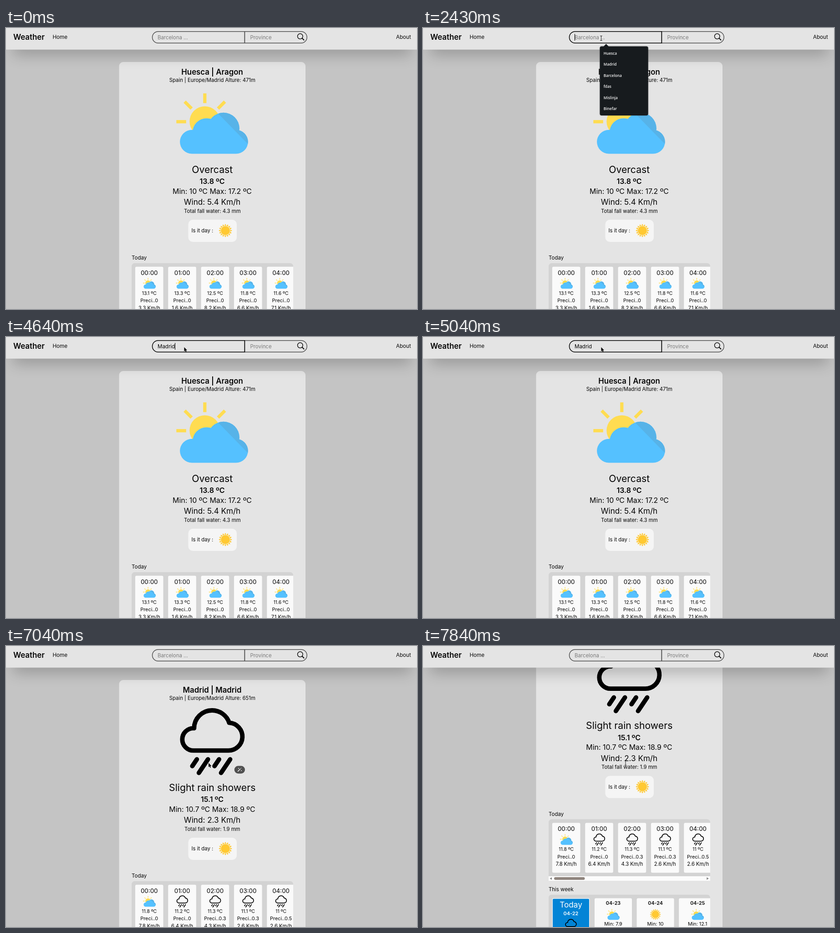
Recreate the animation shown at these times as an HTML page with a canvas. Size 903 by 620 pixels, loop 8 s.

```html
<!DOCTYPE html>
<html lang="en">
<head>
<meta charset="utf-8">
<title>Weather</title>
<style>
html, body { margin: 0; width: 100%; height: 100%; overflow: hidden; background: #c4c4c4; }
canvas { display: block; }
</style>
</head>
<body>
<canvas id="stage" width="903" height="620"></canvas>
<script>
const W = 903, H = 620, LOOP = 8000, TICK = 201;
const ctx = document.getElementById('stage').getContext('2d');

const CLICK = 1350, OPEN = 1405, TYPE = 3410, CLOSE = 4415, LOAD = 5825, DONE = 6630;
const TAU = Math.PI * 2;

const huesca = {
  title: 'Huesca | Aragon', place: 'Spain | Europe/Madrid Alture: 471m',
  sky: 'Overcast', temp: '13.8', min: '10', max: '17.2', wind: '5.4', water: '4.3',
  rainy: false,
  hours: [['13.1', '0', '3.3'], ['13.3', '0', '1.6'], ['12.5', '0', '8.2'], ['11.8', '0', '6.6'], ['11.6', '0', '7.1']]
};
const madrid = {
  title: 'Madrid | Madrid', place: 'Spain | Europe/Madrid Alture: 651m',
  sky: 'Slight rain showers', temp: '15.1', min: '10.7', max: '18.9', wind: '2.3', water: '1.9',
  rainy: true,
  hours: [['11.8', '0', '7.8'], ['11.2', '0', '6.4'], ['11.3', '0.3', '4.3'], ['11.1', '0.3', '2.6'], ['11', '0.5', '2.6']]
};
const week = [['04-23', cloudSun, '7.9'], ['04-24', weekSun, '10'], ['04-25', cloudSun, '12.1']];
const history = ['Huesca', 'Madrid', 'Barcelona', 'fdas', 'Mislinja', 'Binefar'];

function text(s, x, y, size, opt = {}) {
  ctx.font = `${opt.weight || 400} ${size}px ${opt.font || 'Inter, sans-serif'}`;
  ctx.textAlign = opt.align || 'center';
  ctx.fillStyle = opt.color || '#050505';
  ctx.fillText(s, x, y);
}

function box(x, y, w, h, r, color) {
  ctx.beginPath();
  ctx.roundRect(x, y, w, h, r);
  ctx.fillStyle = color;
  ctx.fill();
}

function disc(x, y, r, color) {
  ctx.beginPath();
  ctx.arc(x, y, r, 0, TAU);
  ctx.fillStyle = color;
  ctx.fill();
}

function poly(points, color) {
  ctx.beginPath();
  points.forEach(([x, y]) => ctx.lineTo(x, y));
  ctx.closePath();
  ctx.fillStyle = color;
  ctx.fill();
}

function line(x1, y1, x2, y2) {
  ctx.beginPath();
  ctx.moveTo(x1, y1);
  ctx.lineTo(x2, y2);
  ctx.stroke();
}

// Runs a drawing made around (ox, oy) at another place and scale.
function place(x, y, scale, ox, oy, draw) {
  ctx.save();
  ctx.translate(x, y);
  ctx.scale(scale, scale);
  ctx.translate(-ox, -oy);
  draw();
  ctx.restore();
}

function cloudSun(x, y, scale = 0.178) {
  place(x, y, scale, 453.5, 210.75, () => {
    const yellow = '#ffdc51';
    for (let i = 0; i < 4; i++) {
      ctx.save();
      ctx.translate(437, 206.5);
      ctx.rotate((i - 2) * Math.PI / 4);
      ctx.fillStyle = yellow;
      ctx.fillRect(-3.6, -62.5, 7.2, 21.5);
      ctx.restore();
    }
    disc(437, 206, 33.5, yellow);
    const cloud = new Path2D();
    for (const [cx, cy, r] of [[408.7, 250.8, 26.4], [441, 230, 31], [478, 221.5, 35], [505.5, 250.8, 26.4]]) {
      cloud.moveTo(cx + r, cy);
      cloud.arc(cx, cy, r, 0, TAU);
    }
    cloud.rect(408.7, 230, 96.8, 47.2);
    ctx.fillStyle = '#55c1ff';
    ctx.fill(cloud);
    ctx.clip(cloud);
    poly([[462, 184], [534, 258], [534, 184]], '#57b3e8');
  });
}

function rain(x, y, scale = 0.18) {
  place(x, y, scale, 453, 211, () => {
    ctx.strokeStyle = '#000';
    ctx.lineWidth = 9.8;
    ctx.lineCap = ctx.lineJoin = 'round';
    ctx.beginPath();
    ctx.arc(411.7, 206, 24.7, Math.PI / 2, -Math.PI / 2 + 0.05);
    ctx.arc(452.5, 181.5, 39.5, Math.PI, -0.31);
    ctx.arc(488.5, 200, 30.6, -Math.PI / 2 + 0.05, Math.PI / 2);
    ctx.closePath();
    ctx.stroke();
    for (let i = 0; i < 4; i++) {
      const top = 419 + i * 24.4, long = i % 2;
      line(top, 250, top - (long ? 20 : 10), long ? 280 : 265);
    }
  });
}

function sun(x, y, scale = 1) {
  place(x, y, scale, 0, 0, () => {
    const color = '#ffc933';
    disc(0, 0, 10, color);
    for (let i = 0; i < 16; i++) {
      ctx.rotate(TAU / 16);
      poly([[-2.2, -10.7], [2.2, -10.7], [0, -15]], color);
    }
  });
}

function weekSun(x, y) { sun(x, y, 0.82); }

function hourPanel(data) {
  ctx.save();
  ctx.beginPath();
  ctx.roundRect(276, 518.7, 355, 136, [7, 7, 0, 0]);
  ctx.clip();
  ctx.fillStyle = '#d3d3d3';
  ctx.fillRect(276, 518, 355, 137);
  data.hours.forEach(([temp, fall, wind], i) => {
    const x = 314.7 + i * 72.35;
    box(x - 30.8, 526.7, 61.6, 110, 3, '#fafafa');
    text(`0${i}:00`, x, 544.5, 13.4);
    (data.rainy && i ? rain : cloudSun)(x + 0.3, 563.5);
    text(`${temp} ºC`, x, 588.6, 10.3);
    text(`Preci..${fall}`, x, 605.2, 10.9);
    text(`${wind} Km/h`, x, 621.5, 11.2);
  });
  ctx.fillStyle = '#fcfcfc';
  ctx.fillRect(276, 644.5, 355, 10.2);
  box(288, 646.6, 67.5, 6, 3, '#8f857e');
  poly([[278.5, 649.6], [283, 646.8], [283, 652.4]], '#858585');
  poly([[627.8, 649.6], [623.3, 646.8], [623.3, 652.4]], '#858585');
  ctx.restore();
}

function weekPanel() {
  text('This week', 276, 677.5, 11.4, { align: 'left' });
  ctx.save();
  ctx.beginPath();
  ctx.roundRect(276, 685, 355, 180, 7);
  ctx.clip();
  ctx.fillStyle = '#d3d3d3';
  ctx.fillRect(276, 685, 355, 180);
  box(284, 693, 82, 150, 3, '#fafafa');
  box(285, 694.2, 80, 147, 2, '#0384d6');
  text('Today', 325, 713.5, 17.2, { color: '#fff' });
  text('04-22', 325, 730.5, 10.9, { color: '#fff', weight: 600 });
  rain(325, 752);
  week.forEach(([day, icon, min], i) => {
    const x = 418 + i * 92.6;
    box(x - 41, 693, 82, 150, 3, '#fafafa');
    text(day, x, 707.5, 10.7, { weight: 600 });
    icon(x, 728.8);
    text(`Min: ${min}`, x, 753.7, 10.8);
  });
  ctx.restore();
}

function report(data, scroll) {
  ctx.save();
  ctx.translate(0, -scroll);
  box(248.5, 75, 409.5, 900, 9, '#e4e4e4');
  text(data.title, 453, 102.5, 16.8, { weight: 600 });
  text(data.place, 453.3, 119.4, 11.3);
  (data.rainy ? rain : cloudSun)(453.3, 211, 1);
  text(data.sky, 453.2, 319.5, 21.2);
  text(`${data.temp} ºC`, 453, 344, 16, { weight: 600 });
  text(`Min: ${data.min} ºC Max: ${data.max} ºC`, 453, 365.8, 15.9);
  text(`Wind: ${data.wind} Km/h`, 453, 390, 17.1);
  text(`Total fall water: ${data.water} mm`, 453.3, 407.6, 11.3);
  box(400.5, 423, 106.5, 49, 10, '#f5f5f5');
  text('Is it day :', 407.5, 451.3, 11.3, { align: 'left' });
  sun(482, 447);
  text('Today', 276, 511, 11.5, { align: 'left' });
  hourPanel(data);
  weekPanel();
  ctx.restore();
}

function wandButton() {
  box(501.7, 264.5, 23.3, 17, 8.5, '#505050');
  ctx.strokeStyle = '#fff';
  ctx.lineCap = 'round';
  ctx.lineWidth = 1.5;
  line(509.5, 276.5, 514.5, 271.5);
  ctx.lineWidth = 1;
  line(516, 270, 517, 269);
  for (const [x, y] of [[511, 270], [517, 275]]) disc(x, y, 0.9, '#fff');
}

function loading(t) {
  // Grows to full size, then fades.
  const p = ((t - 5655) % 750) / 750;
  ctx.globalAlpha = p < 0.5 ? p * 2 : 2 - p * 2;
  disc(458.5, 260.5, 13.7 * Math.min(1, p * 2), '#171c20');
  ctx.globalAlpha = 1;
  text('Fetching data...', 458.5, 301.5, 16.9);
  text('Please wait', 458.5, 318.6, 11.5);
}

function caretOn(t) {
  const since = t < TYPE ? t - CLICK : t - Math.min(t, 4215);
  return Math.floor(since / 530) % 2 === 0;
}

function header(t, typed, focus, shift) {
  ctx.save();
  ctx.shadowColor = 'rgba(0,0,0,.23)';
  ctx.shadowBlur = 32;
  ctx.shadowOffsetY = 18;
  ctx.fillStyle = '#e4e4e4';
  ctx.fillRect(16, 4, 874 + shift * 2, 37);
  ctx.restore();
  ctx.fillStyle = '#e4e4e4';
  ctx.fillRect(0, 0, W, 47.7);

  ctx.save();
  ctx.translate(shift, 0);
  const left = { align: 'left' }, hint = { align: 'left', color: '#7b7b7b' };
  text('Weather', 16, 26, 16.8, { align: 'left', weight: 600 });
  text('Home', 102.5, 24, 11.6, left);
  text('About', 857, 24, 11.6, left);

  const edge = (x, w, r, color) => {
    ctx.beginPath();
    ctx.roundRect(x, 7.7, w, 25.6, r);
    ctx.strokeStyle = color;
    ctx.lineWidth = 1.5;
    ctx.stroke();
  };
  edge(524.4, 136.8, [0, 13, 13, 0], '#505050');
  edge(321.5, 202.9, [13, 0, 0, 13], focus ? '#000' : '#505050');
  text('Province', 536.5, 24.7, 11.4, hint);
  if (typed) text(typed, 333, 24.7, 11.5, left);
  else text('Barcelona ...', 333, 24.7, 11.4, hint);
  if (focus && caretOn(t)) {
    ctx.font = '11.5px Inter, sans-serif';
    ctx.fillStyle = '#000';
    ctx.fillRect(Math.round(333 + ctx.measureText(typed).width), 13, 1, 15);
  }

  ctx.strokeStyle = '#050505';
  ctx.lineWidth = 1.4;
  ctx.lineCap = 'round';
  ctx.beginPath();
  ctx.arc(646.3, 18.3, 5.8, 0, TAU);
  ctx.stroke();
  ctx.lineWidth = 1.9;
  line(650.7, 22.7, 654.5, 26.5);
  ctx.restore();
}

function dropdown(items) {
  const dark = '#171b1e';
  ctx.save();
  ctx.shadowColor = 'rgba(0,0,0,.3)';
  ctx.shadowBlur = 3;
  box(388.5, 40.5, 106.2, 30 + 24.5 * (items.length - 1), 4, dark);
  ctx.restore();
  poly([[402.3, 35], [396, 41.5], [408.6, 41.5]], dark);
  items.forEach((s, i) => text(s, 396.8, 58.6 + 24.5 * i, 8.3,
    { align: 'left', weight: 600, color: '#f4f4f4', font: '"Open Sans", sans-serif' }));
}

const ease = p => p * p * (3 - 2 * p);
const span = (t, a, b) => ease(Math.max(0, Math.min(1, (t - a) / (b - a))));

const path = [[600, 640, 632], [1206, 391.5, 22.5], [5200, 391.5, 22.5], [6030, 414, 227], [6630, 445, 258]];

function pointerAt(t) {
  let [, x, y] = path[0];
  for (let i = 1; i < path.length; i++) {
    const p = span(t, path[i - 1][0], path[i][0]);
    x += (path[i][1] - path[i - 1][1]) * p;
    y += (path[i][2] - path[i - 1][2]) * p;
  }
  return [x, y];
}

function pointer(x, y, beam) {
  if (beam) {
    ctx.strokeStyle = '#222';
    ctx.lineWidth = 1;
    ctx.lineCap = 'butt';
    line(x, y - 5, x, y + 5);
    line(x - 2.3, y - 5, x + 2.3, y - 5);
    line(x - 2.3, y + 5, x + 2.3, y + 5);
    return;
  }
  place(x, y, 1, 0, 0, () => {
    poly([[0, 0], [0, 9.3], [2.1, 7.4], [3.6, 10.7], [5.1, 10], [3.7, 6.9], [6.5, 6.7]], '#050505');
  });
}

function draw(t) {
  const busy = t >= LOAD && t < DONE;
  const data = t < LOAD ? huesca : madrid;
  const scroll = 136.5 * span(t, 7200, 7800);
  const focus = t >= OPEN && t < LOAD;
  const letters = t < TYPE ? 0 : Math.min(6, 2 + Math.floor((t - TYPE) / TICK));
  const typed = t < LOAD ? 'Madrid'.slice(0, letters) : '';
  const [x, y] = pointerAt(t);

  ctx.fillStyle = '#c4c4c4';
  ctx.fillRect(0, 0, W, H);
  if (busy) loading(t);
  else report(data, scroll);
  if (t >= DONE && scroll < 1) wandButton();
  header(t, typed, focus, busy ? 5.5 : 0);
  if (t >= OPEN && t < CLOSE) dropdown(typed ? ['Madrid'] : history);
  if (t >= OPEN && t < OPEN + TICK) disc(392.5, 21.3, 6.8, 'rgba(250,200,50,.75)');
  if (t > 600) pointer(x, y, (t > 1200 && t < CLOSE) || scroll > 100);
}

function frame(now) {
  const t = now % LOOP;
  draw(Math.floor(t / TICK) * TICK + 4);
  requestAnimationFrame(frame);
}
requestAnimationFrame(frame);
</script>
</body>
</html>
```
